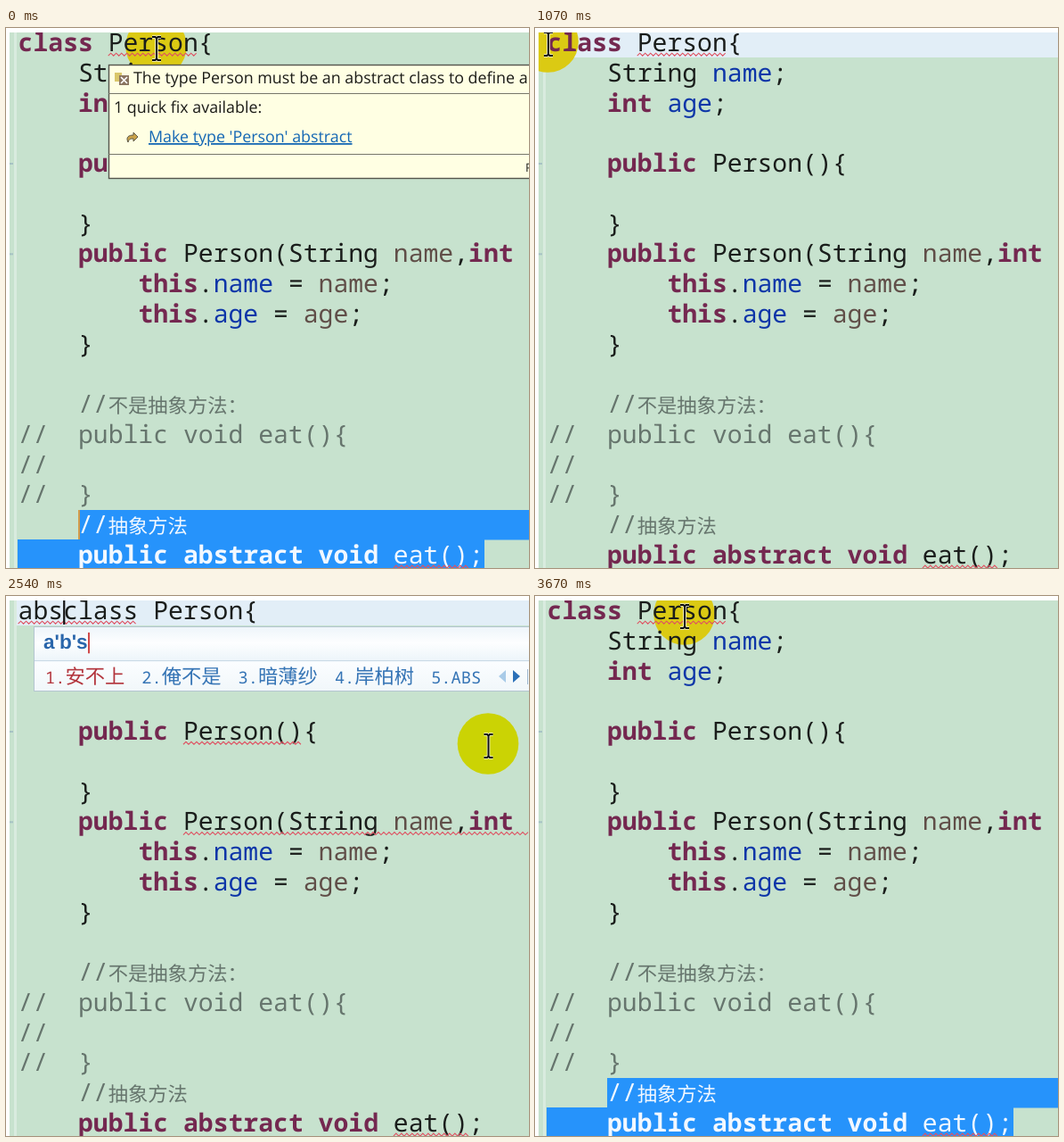
Animation, 587 px wide and 605 px high, one loop 3740 ms. Source, as an HTML page:

```html
<!DOCTYPE html>
<html lang="zh-CN">
<head>
<meta charset="utf-8">
<style>
html, body { margin: 0; width: 100%; height: 100%; overflow: hidden; background: #fff; }
svg { display: block; width: 587px; height: 605px; }
text { white-space: pre; text-rendering: geometricPrecision; }
.code { font: 500 28.08px "Noto Sans Mono", "DejaVu Sans Mono", monospace; fill: #1a1d1b; }
.code .key { font-weight: 600; fill: #742850; }
.code .field { fill: #0d35a8; }
.code .param { fill: #604e48; }
.code.note { font-weight: 400; fill: #66756d; }
.cjk { font: 300 22.3px "Noto Sans CJK SC", "Noto Sans CJK", sans-serif; }
.picked, .picked tspan { fill: #f2f8ff !important; }
.tip { font: 17.85px "Open Sans", "Noto Sans", sans-serif; fill: #1c1c18; }
.ime { font: 300 18.65px "Noto Sans Mono", "Liberation Mono", monospace; fill: #3574b5; }
.preedit { font: bold 22.6px "Liberation Sans", Arial, sans-serif; fill: #2a66ab; }
.wave { fill: none; stroke: #df5262; stroke-width: 1.1; }
</style>
</head>
<body>
<svg id="stage" viewBox="0 0 587 605"></svg>
<script>
const LOOP = 3740, LEFT = 13.6, CHAR = 16.85, PITCH = 33.76;
const CLICK = 1000, RESET = 3600, TIP_HIDE = 850;
const stage = document.getElementById('stage');

const source = [
  '', '    String name;', '    int age;', '', '    public Person(){', '', '    }',
  '    public Person(String name,int ', '        this.name = name;',
  '        this.age = age;', '    }', '', '    //不是抽象方法：',
  '//  public void eat(){', '//', '//  }', '    //抽象方法',
  '    public abstract void eat();'
];

// time, x, y of the mouse pointer
const pointerSteps = [
  [0, 169, 23], [130, 167, 23], [200, 164, 23], [330, 159, 23], [400, 153, 24],
  [530, 146, 25], [650, 139, 25], [720, 122, 24], [800, 94, 22], [870, 60, 20],
  [930, 30, 18], [1000, 15, 18], [1270, 90, 40], [1340, 250, 86],
  [1470, 430, 138], [1540, 541.5, 168], [RESET, 172, 23], [3670, 168, 23]
];

// time, typed letters, shown spelling, candidates
const typingSteps = [
  [2140, 'a', 'a', '啊 阿 呵 吖 嗄 锕'],
  [2270, 'ab', "a'b", '阿爸 安保 按表 爱吧 奥博'],
  [2400, 'abs', "a'b's", '安不上 俺不是 暗薄纱 岸柏树 ABS'],
  [2670, 'abst', "a'b's't", '安不上他 俺不是他 暗薄纱 ABS'],
  [2740, 'abstr', 'abstr', 'abstract 案板石台 阿部氏鲀 ABS 安不上'],
  [2810, 'abstra', 'abstra', 'abstract 案板石台 阿部氏鲀 ABS 安不上'],
  [2940, 'abstract', 'abstract', 'abstract 案板石台 阿部氏鲀 ABS 安不上'],
  [3090, 'abstract', '', ''],
  [3200, 'abstract ', '', '']
];

const latest = (steps, t) => steps.filter(step => step[0] <= t).pop();
const colX = col => LEFT + col * CHAR;
const baseline = row => 26 + row * PITCH;
const rect = (x, y, w, h, fill, extra = '') =>
  `<rect x="${x}" y="${y}" width="${w}" height="${h}" fill="${fill}" ${extra}/>`;
const text = (x, y, cls, body) => `<text x="${x}" y="${y}" class="${cls}">${body}</text>`;
const wrapCjk = s => s.replace(/[^\x00-\xff]+/g, run => `<tspan class="cjk">${run}</tspan>`);

function colour(line, row) {
  return line.replace(/\b(public|int|this|void|abstract|class|name|age)\b/g, (word, _, at) => {
    const variable = word === 'name' || word === 'age';
    const field = row < 3 || line.slice(0, at).endsWith('this.');
    const cls = !variable ? 'key' : field ? 'field' : 'param';
    return `<tspan class="${cls}">${word}</tspan>`;
  });
}

function codeLine(line, row, picked) {
  const start = line.search(/\S/);
  if (start < 0) return '';
  const body = line.slice(start), note = body.startsWith('//');
  return text(colX(start), baseline(row), `code${note ? ' note' : ''}${picked ? ' picked' : ''}`,
    note ? wrapCjk(body) : colour(body, row));
}

function wave(row, from, to) {
  const y = baseline(row) + 5.2, end = Math.min(colX(to), 587);
  let d = `M${colX(from)} ${y}`;
  for (let x = colX(from) + 3, up = true; x <= end; x += 3, up = !up) d += `L${x} ${y - (up ? 3 : 0)}`;
  return `<path class="wave" d="${d}"/>`;
}

function pointer(x, y) {
  const d = `M${x - 5} ${y - 13}h3.5l1.5 1.5 1.5-1.5h3.5M${x} ${y - 11.5}v23M${x - 5} ${y + 13}h3.5l1.5-1.5 1.5 1.5h3.5`;
  return `<path d="${d}" fill="none" stroke="#f4f4dc" stroke-width="3.6"/>` +
    `<path d="${d}" fill="none" stroke="#111" stroke-width="2"/>`;
}

function tooltip() {
  const rule = y => rect(115, y, 472, 1, '#77776a');
  return rect(115.5, 41.5, 480, 127, '#ffffe3', 'stroke="#55554c" stroke-width="1.4"') +
    rule(73) + rule(141) +
    rect(122, 50, 8, 10, '#d9c66a') + rect(127, 53, 11, 11, '#8a7560') +
    '<path d="M129 55l7 7m0-7l-7 7" stroke="#fff" stroke-width="1.6"/>' +
    text(143, 62, 'tip', 'The type Person must be an abstract class to define abstract') +
    text(121, 95, 'tip', '1 quick fix available:') +
    '<path d="M137 128c-3-6 1-8 6-8v-3l5 5-5 5v-3c-3 0-5 0-6 4z" fill="#c9a24a" stroke="#5c5948"/>' +
    text(160, 128, 'tip', '<tspan fill="#1467b4" text-decoration="underline">Make type \'Person\' abstract</tspan>') +
    '<text x="583" y="161" class="tip" style="font-size:13px">Press</text>';
}

function imePanel(spelling, candidates) {
  let x = 44;
  const items = candidates.split(' ').map((word, i) => {
    const label = `${i + 1}.${word}`, at = x;
    for (const c of label) x += c > '\xff' ? 22.3 : 11.2;
    x += 19;
    return `<text x="${at}" y="98" class="ime"${i ? '' : ' style="fill:#b3353d"'}>${wrapCjk(label)}</text>`;
  });
  const arrows = x < 560
    ? '<path d="M561 83v14l-8-7z" fill="#a9cbe8"/><path d="M569 83v14l8-7z" fill="#2b70b8"/>' + rect(585, 82, 1, 17, '#9fb9d0')
    : '';
  return rect(31.5, 34.5, 570, 72, 'url(#panel)', 'stroke="#b4c5d0"') +
    rect(32, 72, 555, 1, '#c9d9e6') +
    text(42, 59, 'preedit', spelling +
      '<tspan dx="-2" style="font-weight:400;font-size:25px;fill:#d04a4a">|</tspan>') +
    items.join('') + arrows;
}

function scene(t) {
  const [, px, py] = latest(pointerSteps, t);
  const [, typed, spelling, candidates] = t < RESET && latest(typingSteps, t) || [0, '', '', ''];
  const editing = t >= CLICK && t < RESET;
  const broken = editing && t >= 2400 && t < 3340;
  const solved = editing && t >= 3340;
  const joined = typed && !typed.endsWith(' ');
  const head = `${typed}class Person{`;

  let out = '<defs><clipPath id="view"><rect x="4" y="5" width="583" height="600"/></clipPath>' +
    '<linearGradient id="panel" x2="0" y2="1"><stop offset="0" stop-color="#eef5fa"/>' +
    '<stop offset=".25" stop-color="#fdfeff"/><stop offset=".52" stop-color="#edf5fa"/>' +
    '<stop offset=".56" stop-color="#fbfdff"/><stop offset="1" stop-color="#f1f7fa"/></linearGradient></defs>' +
    rect(0, 0, 587, 605, '#fff') + '<g clip-path="url(#view)">' +
    rect(4, 5, 583, 600, '#c7e2ce') + rect(9, 5, 3, 600, '#d9ebdf');
  for (const row of [4, 7]) out += rect(4, baseline(row) - 10, 4, 2, '#a6c2c4');

  if (editing) out += rect(12, 5, 575, 28, '#e2eef7');
  else out += rect(81, 540, 506, 33.5, '#2693fb') + rect(13, 573, 524, 32, '#2693fb');
  out += `<circle cx="${px - 0.5}" cy="${py - 2.5}" r="34.3" fill="${t >= 1270 && t < RESET ? '#cbd304' : '#dbca13'}"/>`;

  out += joined ? text(LEFT, baseline(0), 'code', head) : codeLine(head, 0);
  source.forEach((line, row) => out += codeLine(line, row, !editing && row > 15));

  if (broken) {
    out += wave(4, 11, 19) + wave(7, 11, 36);
    if (joined) out += wave(0, 0, typed.length + 5);
  } else if (!solved) {
    out += wave(0, typed.length + 6, typed.length + 12);
  }
  if (!solved) out += wave(17, 25, 30);

  if (editing) {
    const lit = typed || t < 1470 || t >= 1940;
    if (lit) out += rect(colX(typed.length), 5, 2.2, 27, '#111');
  } else if (t < 400) {
    out += rect(81, 540, 2, 33, '#d39a4a');
  }
  if (t < TIP_HIDE) out += tooltip();
  if (spelling) out += imePanel(spelling, candidates);
  return out + pointer(px, py) + '</g>';
}

let shown = '', began = performance.now();
function frame(now) {
  const next = scene(Math.max(0, now - began) % LOOP);
  if (next !== shown) stage.innerHTML = shown = next;
  requestAnimationFrame(frame);
}
frame(began);
</script>
</body>
</html>
```
